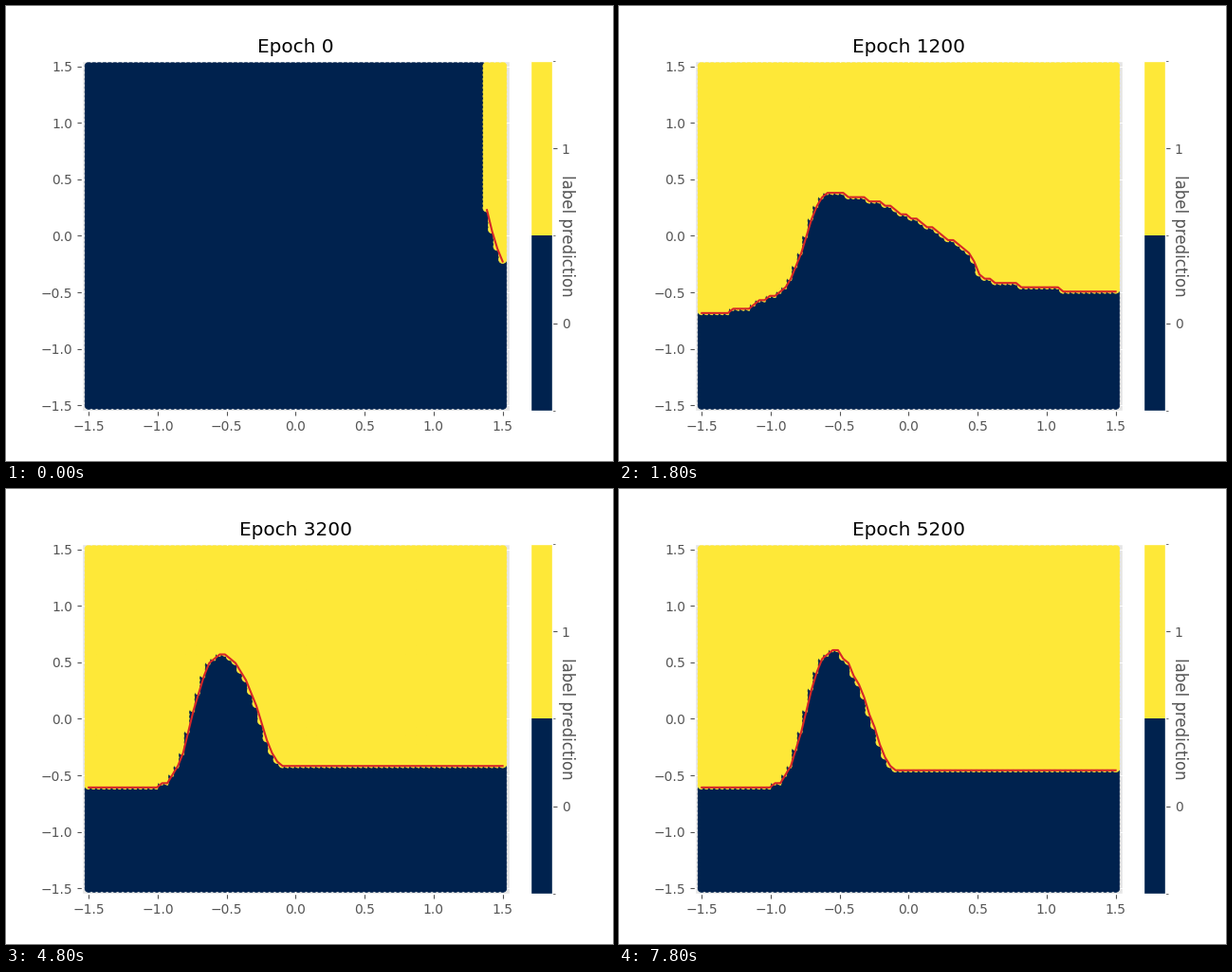
These frames come from a looping animation (640 px wide and 480 px high, 8 s). A matplotlib script:

```python
import numpy as np
import matplotlib.pyplot as plt
from matplotlib.animation import FuncAnimation
from matplotlib.cm import ScalarMappable
from matplotlib.colors import ListedColormap, Normalize
from matplotlib.path import Path

plt.style.use("ggplot")
plt.rcParams["font.family"] = "DejaVu Sans"

GRID = 80
INTERVAL = 100
FRAMES = 80
FRAMES_PER_STEP = 3
EPOCHS_PER_STEP = 200
PEAK_COL = 25

cols, rows = np.meshgrid(np.arange(GRID), np.arange(GRID), indexing="ij")
points = np.column_stack([cols.ravel(), rows.ravel()])


def to_data(index):
    return -1.5 + 3 * np.asarray(index, float) / (GRID - 1)


def ramp(epoch, *values):
    """Linear course through values that are reached every 800 epochs."""
    return np.interp(epoch, 800 * np.arange(1, len(values) + 1), values)


def untrained_boundary():
    x = np.linspace(75.6, GRID - 1, 18)
    y = 33.2 + 12.5 * ((GRID - 1 - x) / 3) ** 1.3
    return np.column_stack([np.r_[0, 75.5, x], np.r_[GRID, GRID, y]])


def rise(epoch, peak):
    """Logistic climb with a soft foot that sharpens during training."""
    x = np.arange(PEAK_COL + 1)
    base = ramp(epoch, 22, 21.3, 23.1)
    center = ramp(epoch, 20, 19.2, 19.4, 19.7)
    foot = ramp(epoch, 4.5, 2.5, 0.2, 0)
    y = base + (peak + 1.5 - base) / (1 + np.exp((center - x) / 1.65))
    y += foot * np.exp(-((x - 15) / 6) ** 2)
    return x, np.minimum(y, peak)


def fall(epoch, peak):
    """Descent as column over height: gentle, then folded, then steep."""
    base = ramp(epoch, 22.5, 27.4, 28.3, 28.3, 27.6, 27.2)
    f = np.linspace(1, 0.02, 200)
    gentle = 24 * (1 / f - 1) ** (1 / 2.3)
    folded = 38 * (1 - f) ** 0.585 - 21 * np.exp(-((f - 0.16) / 0.18) ** 2)
    power = 1.6 + 0.9 * np.exp((2400 - epoch) / 1000)
    steep = 9.7 * ((1 - f) / 0.9) ** (1 / power) + 0.04 / f
    reach = (ramp(epoch, 1, 0) * gentle + ramp(epoch, 0, 1, 0) * folded
             + ramp(epoch, 0, 0, 1) * steep)
    return np.r_[PEAK_COL + reach, GRID], np.r_[base + (peak - base) * f, base]


def boundary(epoch):
    """Decision boundary in (column, row) grid units."""
    if epoch == 0:
        return untrained_boundary()
    peak = ramp(epoch, 47.8, 50.6, 53.6, 54.6, 55.4, 55.6)
    x, y = np.hstack([rise(epoch, peak), fall(epoch, peak)])
    growth = np.interp(epoch, [200, 800], [0.45, 1])
    return np.column_stack([x, 33 + growth * (y - 33)])


def predict(epoch):
    """Label grid indexed [column, row]; 0 below the boundary, 1 above."""
    curve = boundary(epoch)
    outline = np.vstack([(-1, curve[0, 1]), curve, (GRID, curve[-1, 1]),
                         (GRID, -1), (-1, -1)])
    return 1 - Path(outline).contains_points(points).reshape(GRID, GRID).astype(int)


fig = plt.figure(figsize=(6.4, 4.8), dpi=100)
width = 0.775 / 1.1
ax = fig.add_axes([0.125, 0.11, width, 0.77])
cax = fig.add_axes([0.125 + 1.05 * width, 0.11, 0.05 * width, 0.77])
ax.set(xlim=(-1.55, 1.55), ylim=(-1.55, 1.55))
ticks = np.arange(-1.5, 1.6, 0.5)
ax.set_xticks(ticks)
ax.set_yticks(ticks)

cmap = ListedColormap(["#00224e", "#fee838"])
norm = Normalize(-0.5, 1.5)
dots = ax.scatter(to_data(points[:, 0]), to_data(points[:, 1]), s=36, lw=0.5,
                  c=np.zeros(GRID * GRID), cmap=cmap, norm=norm)
line, = ax.plot([], [], color="tab:red", lw=1.5)
title = ax.set_title("")

bar = fig.colorbar(ScalarMappable(norm, cmap), cax=cax, ticks=[0, 1])
bar.set_ticks([-0.5, 0.5, 1.5], minor=True)
bar.ax.set_yticklabels(["0", "1"])
bar.set_label("label prediction", rotation=270)


def update(frame):
    epoch = frame // FRAMES_PER_STEP * EPOCHS_PER_STEP
    labels = predict(epoch)
    dots.set_array(labels.ravel())
    col, row = np.nonzero(np.diff(labels, axis=1) == 1)
    line.set_data(to_data(col), to_data(row + 0.5))
    title.set_text(f"Epoch {epoch}")
    return dots, line, title


anim = FuncAnimation(fig, update, frames=FRAMES, interval=INTERVAL,
                     repeat=True, repeat_delay=0)
plt.show()
```
